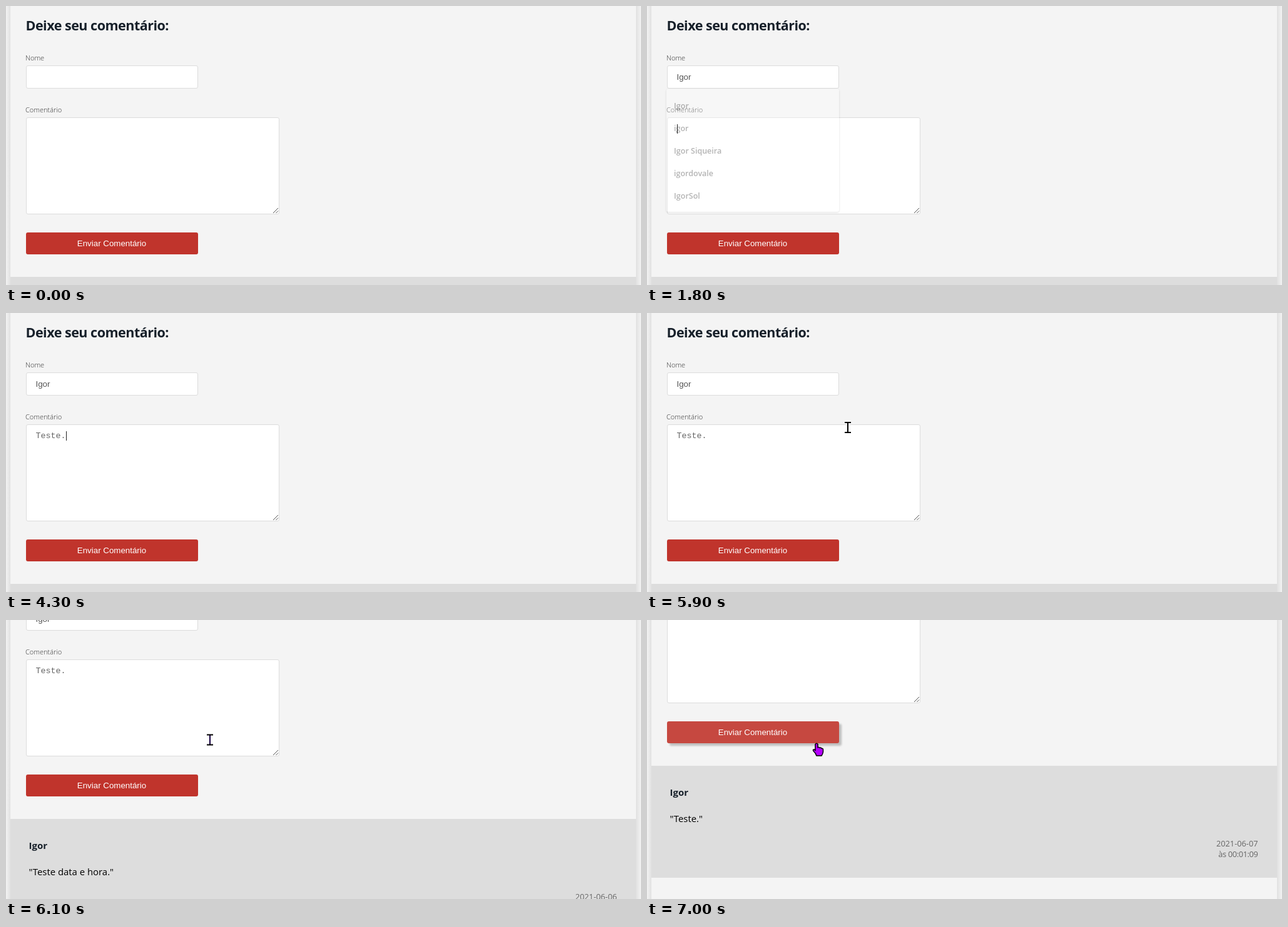
These frames come from a looping animation (1015 px wide and 446 px high, 8000 ms). An HTML page:

```html
<!DOCTYPE html>
<html lang="pt-BR">
<head>
<meta charset="utf-8">
<title>Deixe seu comentário</title>
<style>
  html, body { margin: 0; width: 100%; height: 100%; overflow: hidden; background: #f4f4f4; }
  svg { display: block; width: 100%; height: 100%; }
  text { font-family: "Open Sans", "Noto Sans", sans-serif; white-space: pre; }
  .title { font-size: 21.5px; font-weight: 700; letter-spacing: -.5px; fill: #17202a; }
  .label { font-size: 11px; font-weight: 300; fill: #333; }
  .field { fill: #fff; stroke: #dcdcdc; }
  .input, .send text { font: 13.333px "Liberation Sans", Arial, sans-serif; }
  .input { fill: #555; }
  .area { font: 13.333px "Liberation Mono", "Courier New", monospace; fill: #666; }
  .send text { fill: #fff; text-anchor: middle; }
  .option { font-size: 12.5px; font-weight: 600; fill: #222; }
  .author { font-size: 15px; font-weight: 700; fill: #17202a; }
  .quote { font-size: 14.9px; fill: #000; }
  .stamp { font-size: 12.75px; fill: #666; text-anchor: end; }
  .hour { letter-spacing: -.35px; }
  #list rect { filter: drop-shadow(0 1px 1.5px rgba(0, 0, 0, .4)); }
</style>
</head>
<body>
<svg viewBox="0 0 1015 446" xmlns="http://www.w3.org/2000/svg">
  <defs>
    <linearGradient id="edge">
      <stop offset="0" stop-color="#f2f2f2"/>
      <stop offset="1" stop-color="#e1e1e1"/>
    </linearGradient>
  </defs>
  <rect width="1015" height="446" fill="#f4f4f4"/>
  <rect width="7" height="446" fill="url(#edge)"/>
  <rect width="8" height="446" fill="url(#edge)" transform="matrix(-1 0 0 1 1015 0)"/>

  <g id="page">
    <text class="title" x="31.5" y="39">Deixe seu comentário:</text>
    <text class="label" x="31" y="87">Nome</text>
    <rect class="field" x="32.5" y="95.5" width="274" height="36" rx="2.5"/>
    <text class="input" id="name" x="47.5" y="118"></text>
    <text class="label" x="31" y="170">Comentário</text>
    <rect class="field" x="32.5" y="178.5" width="404" height="154" rx="2.5"/>
    <path d="M427 331l8-8M431.500 331l3.500-3.500" stroke="#555" fill="none"/>
    <text class="area" id="message" x="47.5" y="200"></text>
    <g class="send">
      <rect id="button" x="32" y="362" width="275" height="35" rx="3"/>
      <text x="169" y="384">Enviar Comentário</text>
    </g>
    <rect x="7" y="433" width="1000" height="179" fill="#ddd"/>
    <text class="author" x="36.500" y="481">Igor</text>
    <text class="quote" id="quote" x="36.500" y="523"></text>
    <text class="stamp" id="date" x="976.500" y="562"></text>
    <text class="stamp hour" id="hour" x="976.500" y="579"></text>
    <g id="list">
      <rect x="31" y="132.500" width="276" height="232.500" rx="3" fill="#fff"/>
      <g id="options"></g>
    </g>
    <rect id="caret" width="1" height="15" fill="#222"/>
  </g>

  <g id="beam" fill="none">
    <path d="M-5-8H5M0-8V8M-5 8H5" stroke="#fff" stroke-width="3.500" opacity=".6"/>
    <path d="M-5-8H5M0-8V8M-5 8H5" stroke="#000" stroke-width="2"/>
    <path id="core" d="M0-7V7" stroke="#2a0080" stroke-width="1"/>
  </g>
  <path id="hand" fill="#b400ff" stroke="#000" stroke-width="1.500" stroke-linejoin="round"
    d="M-2 1.500Q0-1 2 1.500V7Q4 5.500 5 7.500Q7 6 8 8.500Q10.500 7.500 10.500 10.500V14Q10 17 8 20H0Q-1 16-5 12.500Q-6.500 9.500-3.500 10L-2 11.500Z"/>
</svg>
<script>
const LOOP = 8000, STEP = 100;
const $ = id => document.getElementById(id);
const ui = {};
for (const id of ['page', 'name', 'message', 'button', 'quote', 'date', 'hour',
  'list', 'options', 'caret', 'beam', 'core', 'hand']) ui[id] = $(id);

const NAMES = ['Igor', 'igor', 'Igi', 'Igor Siqueira', 'igordovale', 'IgorSol'];
const NAME_KEYS = [1200, 1400, 1500, 1600];
const MESSAGE_KEYS = [2900, 3200, 3600, 3800, 3900, 4300];
const CARET_ON = [[500, 1000], [1200, 2200], [2800, 4800], [5300, 5800]];
const LEAVE_NAME = 1700, POINTER_IN = 5700, HOVER = 6300, SENT = 6800;

const SCROLL = [[5900, 0], [6000, 36], [6100, 115], [6200, 190], [6300, 200]];
const POINTER = [[5700, 316, 181], [5900, 321, 183], [6000, 326, 191.5], [6200, 326, 191.5],
  [6300, 298, 188], [6400, 274, 191], [6500, 274, 191], [7000, 271, 197]];

const within = (t, [from, to]) => t >= from && t < to;
const typed = (text, keys, t) => text.slice(0, keys.filter(k => k <= t).length);
const show = (el, on) => el.setAttribute('visibility', on ? 'visible' : 'hidden');
const move = (el, x, y) => el.setAttribute('transform', `translate(${x} ${y})`);

// Linear value of one column of a keyframe list.
function track(keys, t, col = 1) {
  if (t <= keys[0][0]) return keys[0][col];
  const i = keys.findIndex(k => k[0] >= t);
  if (i < 0) return keys[keys.length - 1][col];
  const a = keys[i - 1], b = keys[i];
  return a[col] + (b[col] - a[col]) * (t - a[0]) / (b[0] - a[0]);
}

const options = NAMES.map(name => {
  const el = document.createElementNS('http://www.w3.org/2000/svg', 'text');
  el.setAttribute('class', 'option');
  el.setAttribute('x', 43);
  el.textContent = name;
  ui.options.append(el);
  return el;
});

function drawList(prefix, t) {
  const open = within(t, [NAME_KEYS[0], 1900]);
  ui.list.style.display = open ? '' : 'none';
  if (!open) return;
  ui.list.setAttribute('opacity', track([[1600, 1], [1900, 0]], t));
  let row = 0;
  for (const el of options) {
    const match = el.textContent.toLowerCase().startsWith(prefix.toLowerCase());
    el.style.display = match ? '' : 'none';
    if (match) el.setAttribute('y', 164 + 36 * row++);
  }
  ui.list.firstElementChild.setAttribute('height', 16.5 + 36 * row);
}

function drawCaret(message, t) {
  const inName = t < LEAVE_NAME;
  const width = inName ? ui.name.getComputedTextLength() : message.length * 8;
  ui.caret.setAttribute('x', Math.floor(48 + width));
  ui.caret.setAttribute('y', inName ? 106 : 189);
  show(ui.caret, CARET_ON.some(span => within(t, span)));
}

function drawPointer(t) {
  const x = track(POINTER, t), y = track(POINTER, t, 2);
  move(ui.beam, x, y);
  move(ui.hand, x, y);
  show(ui.beam, within(t, [POINTER_IN, HOVER]));
  show(ui.core, within(t, [6000, HOVER]));
  show(ui.hand, t >= HOVER);
}

function render(time) {
  const t = Math.floor(time % LOOP / STEP) * STEP;
  const sent = t >= SENT, hover = t >= HOVER;
  const name = typed(NAMES[0], NAME_KEYS, t);
  const message = typed('Teste.', MESSAGE_KEYS, t);
  ui.name.textContent = sent ? '' : name;
  ui.message.textContent = sent ? '' : message;
  ui.quote.textContent = sent ? '"Teste."' : '"Teste data e hora."';
  ui.date.textContent = sent ? '2021-06-07' : '2021-06-06';
  ui.hour.textContent = sent ? 'às 00:01:09' : 'às 22:42:11';
  ui.button.setAttribute('fill', hover ? '#c64840' : '#c0342c');
  ui.button.style.filter = hover ? 'drop-shadow(4px 4px 1.5px rgba(0,0,0,.22))' : 'none';
  move(ui.page, 0, -track(SCROLL, t));
  drawList(name, t);
  drawCaret(message, t);
  drawPointer(t);
}

let start;
function tick(now) {
  start ??= now;
  render(now - start);
  requestAnimationFrame(tick);
}
render(0);
requestAnimationFrame(tick);
</script>
</body>
</html>
```
